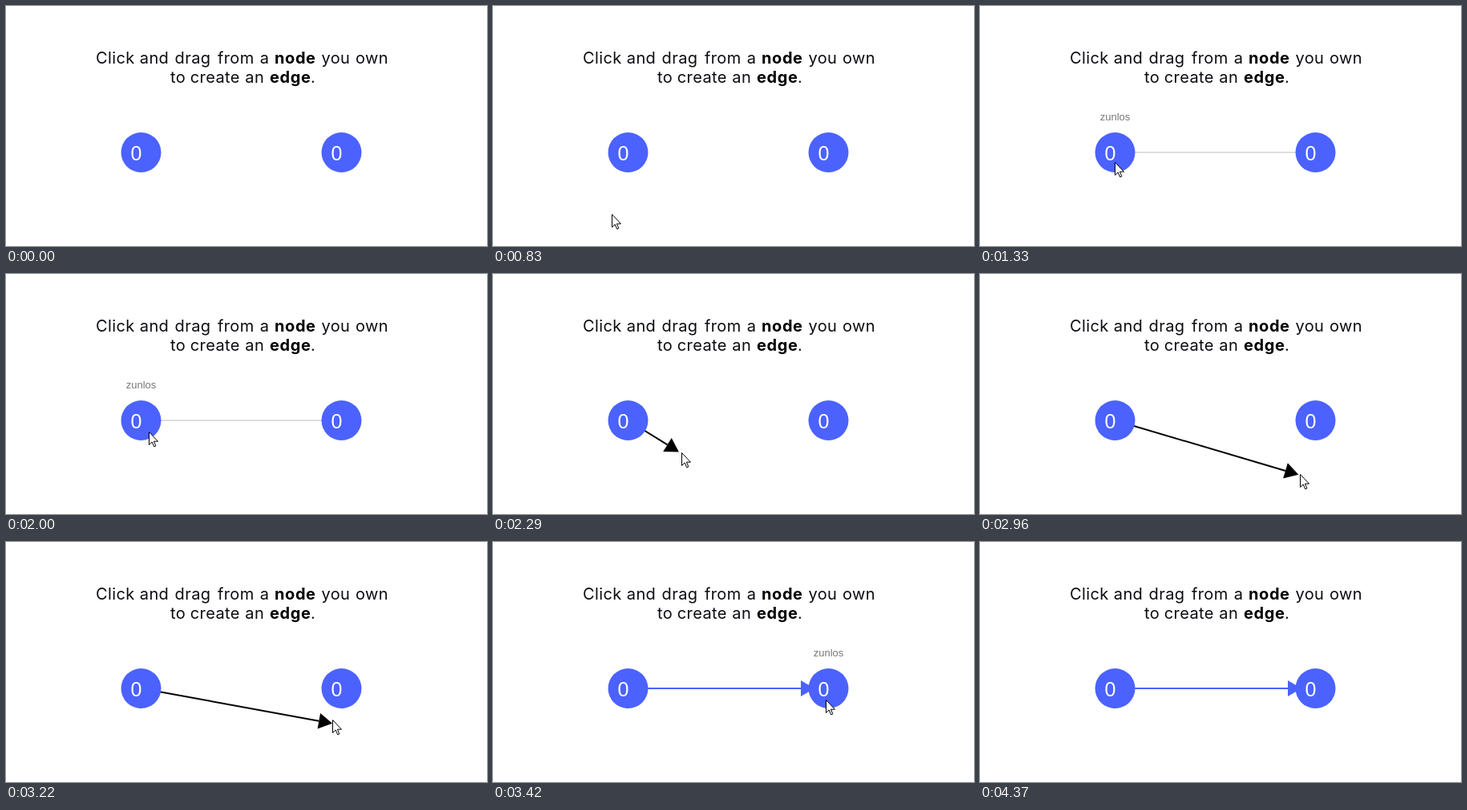
These frames come from a looping animation (600x300 px, 5760 ms). An HTML page:

```html
<!DOCTYPE html>
<html lang="en">
<head>
<meta charset="utf-8">
<title>Create an edge</title>
<style>
html, body { margin: 0; width: 100%; height: 100%; overflow: hidden; background: #fff; }
svg { display: block; width: 600px; height: 300px; }
.head { font: 400 20px Inter, sans-serif; letter-spacing: .4px; text-anchor: middle; fill: #0c0c12; }
.head.bold { font-weight: 700; letter-spacing: .6px; fill: #000; }
.count { font: 25px "Liberation Sans", Arial, sans-serif; fill: #fff; }
.label { font: 13px "Liberation Sans", Arial, sans-serif; text-anchor: middle; fill: #777; }
</style>
</head>
<body>
<svg id="stage" viewBox="0 0 600 300"></svg>
<script>
const LOOP = 5760, ENTER = 670, DRAG = 1870, DROP = 3420, LEAVE = 4370;
const BLUE = '#4b62ff', R = 25, Y = 183, LEFT = 168.5, RIGHT = 418.5;
const HEAD_LENGTH = 17, HEAD_HALF = 10, LAG = 20;

// Pointer path: time, x, y
const path = [
  [670, 143, 284], [900, 150, 250], [1100, 163, 214], [1220, 167, 203],
  [1330, 168, 195], [1590, 167, 191], [1870, 167, 191], [2000, 178, 197],
  [2070, 189, 203], [2420, 262, 235], [2590, 330, 244], [2700, 362, 247],
  [2960, 399, 250], [3060, 399, 250], [3200, 406, 226], [3340, 414, 200],
  [3420, 415, 197], [4080, 415, 197], [4140, 416, 204], [4310, 416, 256]
];

const stage = document.getElementById('stage');

function add(tag, attrs, text) {
  const el = document.createElementNS('http://www.w3.org/2000/svg', tag);
  for (const key in attrs) el.setAttribute(key, attrs[key]);
  if (text) el.textContent = text;
  stage.appendChild(el);
  return el;
}

function show(el, on) {
  el.setAttribute('visibility', on ? 'visible' : 'hidden');
}

// Each word is centred on its own x
function sentence(y, words) {
  for (const [text, x, bold] of words)
    add('text', { x, y, class: bold ? 'head bold' : 'head' }, text);
}

sentence(72, [['Click', 136.3], ['and', 185], ['drag', 233], ['from', 286.8],
  ['a', 322.6], ['node', 360.8, true], ['you', 411.4], ['own', 456.4]]);
sentence(96, [['to', 214.6], ['create', 260.8], ['an', 310.2],
  ['edge', 354.8, true], ['.', 383.2]]);

const hint = add('path', { d: `M${LEFT} ${Y}H${RIGHT}`, stroke: '#dedede', 'stroke-width': 2 });
const shaft = add('line', { x1: LEFT, y1: Y, 'stroke-width': 2 });
const tip = add('path', {});

function node(x) {
  add('circle', { cx: x, cy: Y, r: R, fill: BLUE });
  add('text', { x: x - 13, y: 193, class: 'count' }, '0');
  return add('text', { x, y: 143, class: 'label' }, 'zunlos');
}
const leftLabel = node(LEFT), rightLabel = node(RIGHT);

const pointer = add('path', {
  d: 'M.5 .5V16.5L4.2 13L6.7 18.8L8.9 17.9L6.4 12.2H11.5Z',
  fill: '#fff', stroke: '#000', 'stroke-width': 1
});

function pointerAt(t) {
  const i = path.findIndex(p => p[0] > t);
  if (i === 0) return path[0].slice(1);
  if (i < 0) return path[path.length - 1].slice(1);
  const [t0, x0, y0] = path[i - 1], [t1, x1, y1] = path[i];
  const k = (t - t0) / (t1 - t0);
  return [x0 + (x1 - x0) * k, y0 + (y1 - y0) * k];
}

function drawArrow(x, y, color) {
  const angle = Math.atan2(y - Y, x - LEFT);
  const ux = Math.cos(angle), uy = Math.sin(angle);
  const bx = x - ux * HEAD_LENGTH, by = y - uy * HEAD_LENGTH;
  const dx = -uy * HEAD_HALF, dy = ux * HEAD_HALF;
  shaft.setAttribute('x2', bx);
  shaft.setAttribute('y2', by);
  shaft.setAttribute('stroke', color);
  tip.setAttribute('d', `M${x} ${y}L${bx + dx} ${by + dy}L${bx - dx} ${by - dy}Z`);
  tip.setAttribute('fill', color);
}

function render(t) {
  const [x, y] = pointerAt(t);
  const present = t >= ENTER && t < LEAVE;
  const over = cx => present && Math.hypot(x - cx, y - Y) < R;
  const overLeft = over(LEFT), overRight = over(RIGHT);
  const linked = t >= DROP;
  const dragging = t >= DRAG && !linked && !overLeft;

  show(pointer, present);
  pointer.setAttribute('transform', `translate(${Math.round(x)} ${Math.round(y)})`);
  show(hint, overLeft);
  show(leftLabel, overLeft);
  show(rightLabel, overRight);
  show(shaft, linked || dragging);
  show(tip, linked || dragging);

  if (linked) {
    drawArrow(401, Y, BLUE);
  } else if (dragging) {
    const [ax, ay] = pointerAt(t - LAG);
    drawArrow(ax + 1, ay + 1, '#000');
  }
}

const start = performance.now();
function tick() {
  render((performance.now() - start) % LOOP);
  requestAnimationFrame(tick);
}
tick();
</script>
</body>
</html>
```
